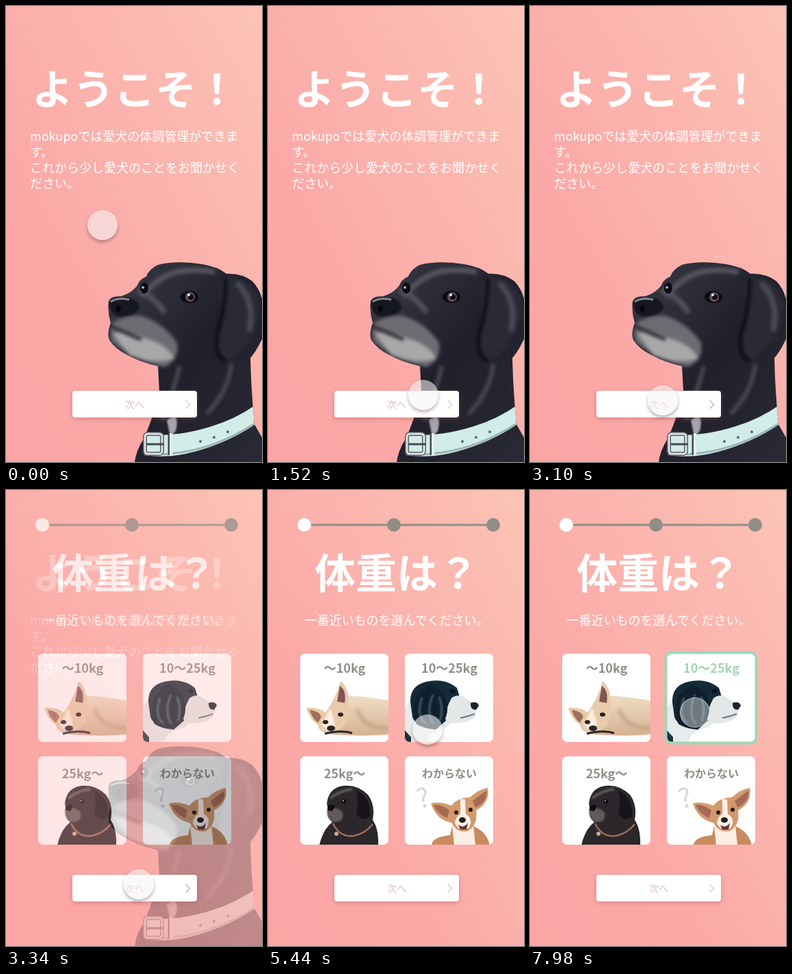
These frames come from a looping animation (374x666 px, 8000 ms). An HTML page:

```html
<!DOCTYPE html>
<html lang="ja">
<head>
<meta charset="utf-8">
<title>愛犬の体調管理</title>
<style>
  html, body { margin: 0; width: 100%; height: 100%; overflow: hidden; }
  body { position: relative; }
  svg { position: absolute; inset: 0; width: 100%; height: 100%; }
  .screen { background: linear-gradient(to top right, #fba5a5, #fba9a7 35%, #fbb5ae 65%, #fcc3b6); }
  text { font-family: "Noto Sans CJK JP", "Noto Sans CJK", sans-serif; text-anchor: middle; }
  .title { font-size: 60px; font-weight: 700; fill: #fff; }
  .body { font-size: 18px; fill: #fff; }
  .left { text-anchor: start; }
  .label { font-size: 18px; font-weight: 700; fill: #918d87; }
  .small { font-size: 16px; }
  .card { fill: #fff; }
  .soft { filter: blur(2.5px); }
  .soft1 { filter: blur(1px); }
  #button { fill: #fff; filter: drop-shadow(0 2px 3px rgba(150,80,80,.4)); }
  #cursor {
    position: absolute; left: -22px; top: -22px; width: 44px; height: 44px;
    border-radius: 50%;
  }
</style>
</head>
<body>
<svg class="screen" viewBox="0 0 374 666">
  <defs>
    <linearGradient id="coat" x1="0" x2="1" y1="0" y2="1">
      <stop offset="0" stop-color="#3b3b48"/><stop offset=".5" stop-color="#20202b"/><stop offset="1" stop-color="#2a2a36"/>
    </linearGradient>
    <clipPath id="dogClip"><path id="bigDog" d="M150 431Q153 423 168 424Q184 419 192 408Q194 400 205 395Q209 384 222 378Q250 371 286 377Q310 381 322 391Q345 390 360 402Q372 415 375 432V484Q366 504 357 514Q358 560 363 611L375 632V666H188Q190 650 201 632Q214 605 224 562L222 526Q196 520 180 511Q160 502 151 488Q147 479 153 463Q148 447 150 431Z"/></clipPath>
  </defs>

  <text class="title" x="188" y="144">ようこそ！</text>
  <text class="body left" x="35" y="197">mokupoでは愛犬の体調管理ができま</text>
  <text class="body left" x="35" y="220">す。</text>
  <text class="body left" x="35" y="243">これから少し愛犬のことをお聞かせく</text>
  <text class="body left" x="35" y="266">ださい。</text>

  <use href="#bigDog" fill="url(#coat)"/>
  <g clip-path="url(#dogClip)">
    <g class="soft">
      <path d="M152 465Q170 452 196 452Q230 462 250 492Q254 515 232 527Q190 520 154 490Z" fill="#6d6c72"/>
      <path d="M156 478Q182 474 205 486Q235 494 246 515Q215 524 180 510Z" fill="#a9a8a8"/>
      <path d="M150 466Q175 478 198 487" stroke="#292933" stroke-width="5" fill="none"/>
      <path d="M198 425Q220 397 250 388Q282 383 305 389" stroke="#55555f" stroke-width="8" fill="none"/>
      <path d="M192 415Q216 424 232 448" stroke="#52525d" stroke-width="8" fill="none"/>
      <path d="M254 526Q244 565 228 605M329 522Q326 562 293 596" stroke="#4a4a56" stroke-width="6" fill="none"/>
      <path d="M322 393Q367 400 371 436Q367 493 324 517Q302 514 307 480Q318 440 310 410Z" fill="#2a2a36"/>
      <path d="M337 404Q365 430 355 475" stroke="#4b4b58" stroke-width="8" fill="none"/>
      <path d="M321 398Q321 441 309 478Q303 511 321 518" stroke="#0b0b14" stroke-width="5" fill="none"/>
    </g>
    <path class="soft1" d="M150 432Q159 424 180 426Q195 430 195 442Q187 453 170 453Q153 456 150 432Z" fill="#171721"/>
    <path d="M153 432Q164 425 180 429" stroke="#85858f" stroke-width="3" fill="none"/>
    <ellipse cx="164" cy="442" rx="4" ry="5" fill="#06060c"/>
    <ellipse cx="268" cy="425" rx="13" ry="9" fill="#0c0c14"/>
    <circle cx="269" cy="425" r="7" fill="#65505a"/>
    <circle cx="270" cy="425" r="4" fill="#0c0c14"/>
    <circle cx="267" cy="422" r="2" fill="#f0f0f4"/>
    <ellipse cx="202" cy="412" rx="6" ry="8" fill="#0c0c14"/>
    <circle cx="200" cy="411" r="2" fill="#a9a9b4"/>
    <path d="M235 605Q255 590 248 621L240 629Z" fill="#a5a5ab" class="soft1"/>
    <path d="M199 626Q250 630 300 614Q336 603 364 583V611Q324 638 275 651Q238 661 202 656Z" fill="#d2ece7"/>
    <path d="M202 654Q285 660 363 610" stroke="#9bb5b5" stroke-width="3" fill="none"/>
    <g fill="#566a70"><circle cx="284" cy="636" r="2"/><circle cx="304" cy="630" r="2"/><circle cx="324" cy="622" r="2"/></g>
  </g>
  <rect x="203" y="625" width="25" height="29" rx="4" fill="none" stroke="#5b5f68" stroke-width="6"/>
  <rect x="203" y="625" width="25" height="29" rx="4" fill="none" stroke="#dbe2e2" stroke-width="3"/>
  <path d="M205 640H231M238 624V656" stroke="#444955" stroke-width="3"/>
  <path d="M241 624V656" stroke="#e6eeec" stroke-width="4"/>
</svg>

<svg class="screen" id="weight" viewBox="0 0 374 666">
  <defs>
    <linearGradient id="tan" x1="0" x2="0" y1="0" y2="1">
      <stop offset="0" stop-color="#f0ddc3"/><stop offset="1" stop-color="#d5b293"/>
    </linearGradient>
    <clipPath id="c0"><rect x="47" y="239" width="129" height="129" rx="7"/></clipPath>
    <clipPath id="c1"><rect x="200" y="239" width="129" height="129" rx="7"/></clipPath>
    <clipPath id="c2"><rect x="47" y="389" width="129" height="129" rx="7"/></clipPath>
    <clipPath id="c3"><rect x="200" y="389" width="129" height="129" rx="7"/></clipPath>
  </defs>

  <path d="M53 51H329" stroke="#918d87" stroke-width="3"/>
  <circle cx="53" cy="51" r="10" fill="#fff"/>
  <g fill="#918d87"><circle cx="184" cy="51" r="10"/><circle cx="329" cy="51" r="10"/></g>
  <text class="title" x="188" y="144">体重は？</text>
  <text class="body" x="188" y="197">一番近いものを選んでください。</text>

  <g class="card">
    <rect x="47" y="239" width="129" height="129" rx="7"/>
    <rect x="200" y="239" width="129" height="129" rx="7"/>
    <rect x="47" y="389" width="129" height="129" rx="7"/>
    <rect x="200" y="389" width="129" height="129" rx="7"/>
  </g>

  <g clip-path="url(#c0)">
    <path d="M109 300Q142 301 177 308V357Q137 361 83 356L88 342Z" fill="url(#tan)"/>
    <path d="M130 320Q139 349 177 348" stroke="#c09c80" stroke-width="4" fill="none" class="soft"/>
    <path d="M56 318Q76 317 84 325Q99 305 106 279Q119 289 117 312Q122 335 111 344Q101 356 87 355Q74 353 73 343Q59 333 56 318Z" fill="#e8cbaa"/>
    <path d="M61 321Q75 323 78 331L73 340Q63 332 61 321Z" fill="#a0705f"/>
    <path d="M105 286Q115 293 112 311L101 309Z" fill="#805557"/>
    <path d="M91 318L98 342L87 352L79 343Z" fill="#fbeee0" class="soft1"/>
    <ellipse cx="84" cy="339" rx="4" ry="3" fill="#2b2024"/>
    <ellipse cx="106" cy="328" rx="4" ry="3" fill="#2b2024"/>
    <ellipse cx="92" cy="348" rx="6" ry="4" fill="#2a252b"/>
    <path d="M83 356Q105 350 123 355" stroke="#2c2428" stroke-width="3" fill="none"/>
  </g>

  <g clip-path="url(#c1)">
    <path d="M199 319Q210 301 221 298L262 326Q271 341 260 347Q235 351 231 369H199Z" fill="#e6ebec"/>
    <path d="M208 310Q207 286 231 280Q258 274 276 289L280 302L300 312L269 329L245 350Q218 348 211 332Z" fill="#152a38"/>
    <path d="M268 304Q279 295 293 307L304 313Q307 318 302 332Q289 343 264 340Q252 335 268 304Z" fill="#e3e7e8"/>
    <path d="M296 311Q306 308 308 315L304 321Q295 321 296 311Z" fill="#1a232b"/>
    <path d="M281 333Q292 331 302 327" stroke="#707a80" stroke-width="2" fill="none"/>
    <path d="M235 284Q252 286 261 307Q266 332 250 345Q235 352 217 342Q207 320 218 300Z" fill="#101f2b"/>
    <path d="M225 303Q216 330 230 341M241 299Q230 325 242 342M250 302Q257 320 251 338" stroke="#365f6c" stroke-width="3" fill="none" class="soft1"/>
    <ellipse cx="270" cy="294" rx="4" ry="3" fill="#08121a"/>
    <path d="M199 350L209 361V369H199Z" fill="#18323f"/>
  </g>

  <g clip-path="url(#c2)">
    <path d="M86 458Q88 438 105 433Q128 428 146 445Q157 460 153 482Q162 495 161 519H75Q80 496 94 485Q85 478 88 468Z" fill="#2b272b"/>
    <path d="M87 465Q99 461 109 471Q112 486 96 485Q84 480 87 465Z" fill="#625a58" class="soft1"/>
    <path d="M129 438Q151 450 149 477Q138 486 129 473Q133 455 129 438Z" fill="#17151b"/>
    <path d="M91 450Q105 439 123 437" stroke="#605a58" stroke-width="4" fill="none" class="soft1"/>
    <path d="M87 462Q94 457 98 462L94 469L87 468Z" fill="#0e0c12"/>
    <circle cx="111" cy="455" r="3" fill="#0b0910"/><circle cx="110" cy="454" r="1" fill="#c9c1b5"/>
    <path d="M95 487Q105 508 126 505Q143 501 153 488" stroke="#9d6c55" stroke-width="2.5" fill="none"/>
    <circle cx="100" cy="502" r="3" fill="#c4ad92"/>
  </g>

  <g clip-path="url(#c3)">
    <text x="226" y="464" transform="rotate(-14 226 448)" font-size="39" font-weight="500" fill="#d9d8d6">?</text>
    <path d="M239 519Q239 507 266 504L269 491H300Q320 499 324 519Z" fill="#c88b60"/>
    <path d="M269 490Q287 503 300 489L303 519H272Z" fill="#fbefe3"/>
    <path d="M238 458Q250 454 268 461Q277 449 295 449Q308 437 321 435Q325 456 304 468Q307 489 292 498Q277 502 268 486Q246 482 238 458Z" fill="#d3996c"/>
    <path d="M242 460Q254 459 265 468L262 479Q248 474 242 460Z" fill="#a56a55"/>
    <path d="M319 439Q321 455 303 464L299 454Z" fill="#a56a55"/>
    <path d="M281 451L288 452L289 473Q301 481 293 494Q278 500 273 486Q274 478 281 473Z" fill="#fbefe3"/>
    <circle cx="275" cy="471" r="3" fill="#271a18"/><circle cx="296" cy="467" r="3" fill="#271a18"/>
    <ellipse cx="284" cy="482" rx="5" ry="4" fill="#211a1c"/>
    <path d="M278 489Q286 495 292 486L290 496H281Z" fill="#633a3a"/>
  </g>

  <text class="label" x="112" y="267">〜10kg</text>
  <text class="label" x="265" y="267" id="choice">10〜25kg</text>
  <text class="label" x="112" y="421">25kg〜</text>
  <text class="label small" x="265" y="420">わからない</text>
  <rect id="ring" x="198.5" y="237.5" width="132" height="132" rx="8" fill="none" stroke="#9bd8b9" stroke-width="4"/>
</svg>

<svg viewBox="0 0 374 666">
  <rect id="button" x="97" y="562" width="182" height="39" rx="4"/>
  <text x="188" y="587" font-size="14" fill="#e0bdbb">次へ</text>
  <path id="chevron" d="M262.500 576L268.500 582L262.500 588" fill="none" stroke="#e6c4c2" stroke-width="1.200"/>
</svg>
<div id="cursor"></div>

<script>
  const LOOP = 8000;

  // Each step is [time in ms, styles, easing toward the next step].
  function loop(id, steps) {
    const frames = steps.map(([time, styles, easing = 'linear']) =>
      ({ offset: time / LOOP, easing, ...styles }));
    frames.unshift({ ...frames[0], offset: 0, easing: 'linear' });
    frames.push({ ...frames.at(-1), offset: 1 });
    document.getElementById(id).animate(frames, { duration: LOOP, iterations: Infinity });
  }

  const at = (x, y) => ({ transform: `translate(${x}px, ${y}px)` });
  const swing = 'cubic-bezier(.5,0,.6,.9)';
  const fadeIn = (id, start, end) => loop(id, [
    [start, { opacity: 0 }, 'ease-out'],
    [end, { opacity: 1 }]
  ]);

  loop('cursor', [
    [900, at(141, 320), swing],
    [1520, at(227, 568), 'ease-out'],
    [1800, at(194, 576)],
    [4850, at(194, 576), swing],
    [5440, at(233, 350), 'ease-out'],
    [5720, at(241, 325)]
  ]);

  const raised = {
    backgroundColor: 'rgba(246,244,244,.58)',
    boxShadow: '0 3px 5px rgba(90,50,50,.4), inset 0 0 0 1px rgba(255,255,255,.1)'
  };
  const pressed = {
    backgroundColor: 'rgba(246,244,244,.42)',
    boxShadow: '0 0 1px rgba(90,50,50,.1), inset 0 0 0 1px rgba(255,255,255,.5)'
  };
  loop('cursor', [[7700, raised], [7800, pressed]]);

  fadeIn('weight', 3180, 3480);
  fadeIn('ring', 5560, 5800);
  loop('choice', [[5560, { fill: '#918d87' }], [5800, { fill: '#a3d4b4' }]]);

  const idle = { stroke: '#e6c4c2' }, hover = { stroke: '#d3a5a3' };
  loop('chevron', [[1560, idle], [1760, hover], [5050, hover], [5250, idle]]);
</script>
</body>
</html>
```
